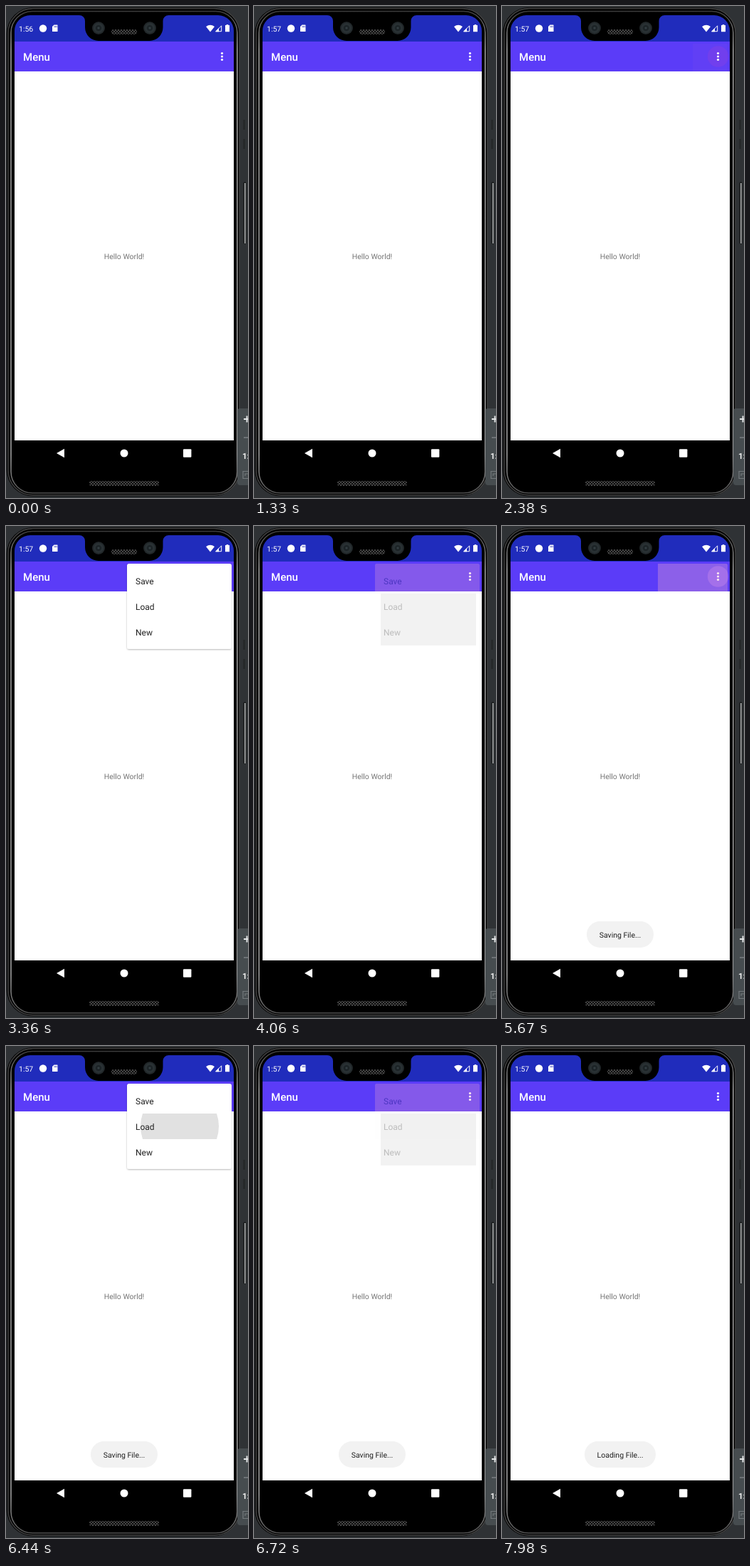
Write an HTML page that moves like this. It is 340 px wide and 692 px high and loops after 8 s.

```html
<!DOCTYPE html>
<html lang="en">
<head>
<meta charset="utf-8">
<title>Options menu</title>
<style>
html, body { margin: 0; width: 100%; height: 100%; overflow: hidden; background: #2f3235; }
svg { display: block; width: 340px; height: 692px; }
text { font-family: Roboto, Arial, sans-serif; font-size: 10.5px; text-rendering: geometricPrecision; }
</style>
</head>
<body>
<svg viewBox="0 0 340 692">
  <defs>
    <linearGradient id="edge" x1="0" y1="0" x2="0" y2="1">
      <stop offset="0" stop-color="#3c3c3c"/>
      <stop offset=".08" stop-color="#a8a8a8"/>
      <stop offset=".5" stop-color="#a0a0a0"/>
      <stop offset=".92" stop-color="#a8a8a8"/>
      <stop offset="1" stop-color="#505050"/>
    </linearGradient>
    <radialGradient id="lens">
      <stop offset="0" stop-color="#3c484c"/>
      <stop offset=".3" stop-color="#181f22"/>
      <stop offset=".6" stop-color="#2c3437"/>
      <stop offset="1" stop-color="#1c2123"/>
    </radialGradient>
    <pattern id="mesh" width="4" height="4" patternUnits="userSpaceOnUse">
      <rect width="4" height="4" fill="#0c0c0c"/>
      <path d="M0 0L4 4M4 0L0 4" stroke="#555" stroke-width=".8"/>
    </pattern>
    <filter id="shade" x="-10%" y="-10%" width="120%" height="120%">
      <feDropShadow dx="0" dy="1" stdDeviation="1.2" flood-opacity=".28"/>
    </filter>
    <clipPath id="screen"><rect x="12" y="13" width="308" height="640" rx="22"/></clipPath>
    <clipPath id="reveal"><rect id="revealBox"/></clipPath>
    <clipPath id="row"><rect id="rowBox" x="170" width="147" height="36"/></clipPath>
  </defs>

  <!-- phone body -->
  <rect width="340" height="692" fill="#2f3235"/>
  <path d="M334.5 160V174M334.5 187V201" stroke="#232527" stroke-width="2"/>
  <rect x="333.5" y="247.5" width="4" height="87" rx="1.5" fill="#17191a"/>
  <path d="M335.8 249V334" stroke="#a0a3a4" stroke-width="1.8"/>
  <rect x="1" y="2" width="327.5" height="687.5" rx="37" fill="#000"/>
  <rect x="3" y="3.5" width="325" height="684.5" rx="35" fill="none" stroke="#444" stroke-width="1.5"/>
  <rect x="7" y="7.5" width="317.8" height="677.5" rx="30" fill="#000" stroke="url(#edge)" stroke-width="1.5"/>

  <!-- screen -->
  <g clip-path="url(#screen)">
    <rect x="12" y="13" width="308" height="38" fill="#202cbc"/>
    <rect x="12" y="50" width="308" height="42" fill="#5b3cf8"/>
    <rect x="12" y="92" width="308" height="519" fill="#fff"/>
    <path d="M103 13A8 8 0 0 1 111 21V30A19 19 0 0 0 130 49H201.5A19 19 0 0 0 220.5 30V21A8 8 0 0 1 228.5 13Z"/>
  </g>
  <rect x="148" y="33" width="36" height="7" rx="3" fill="url(#mesh)"/>
  <circle cx="130" cy="31" r="9" fill="url(#lens)"/>
  <circle cx="202" cy="31" r="9" fill="url(#lens)"/>
  <rect x="117" y="668" width="98" height="7" rx="3" fill="url(#mesh)"/>

  <!-- status bar -->
  <g fill="#fff">
    <text id="clock" x="18" y="35.5"></text>
    <circle cx="52" cy="31.5" r="5.2"/>
    <path d="M67.5 26.5H72Q72.5 26.5 72.5 27V35.500Q72.5 36 72 36H65.5Q65 36 65 35.5V29Z"/>
    <path d="M68 28V30.2M69.6 28V30.2M71.2 28V30.2" stroke="#202cbc" stroke-width=".7"/>
    <path d="M287 36.5L281 29Q287 24.5 293 29Z"/>
    <path d="M294.8 35.7H302.7V27.8Z" fill="none" stroke="#fff" stroke-width="1"/>
    <path d="M294 36.2L299 31V36.2Z"/>
    <path d="M309.7 27V26H312.3V27H314V36.3H308V27Z"/>
  </g>

  <!-- app bar and content -->
  <text x="24" y="77" fill="#fff" style="font-size:15px;font-weight:500">Menu</text>
  <circle id="press" cx="303.5" cy="71" r="14.7"/>
  <g fill="#fff">
    <circle cx="303.5" cy="66.5" r="1.6"/>
    <circle cx="303.5" cy="71" r="1.6"/>
    <circle cx="303.5" cy="75.5" r="1.6"/>
  </g>
  <text x="166" y="355.5" text-anchor="middle" fill="#757575">Hello World!</text>

  <!-- popup -->
  <g id="menu">
    <g clip-path="url(#reveal)">
      <rect id="panel" x="170" y="53" width="147" height="120" rx="3" fill="#fff"/>
      <path id="veil" d="M170 92V56Q170 53 173 53H314Q317 53 317 56V92Z" fill="#ff94b0"/>
      <circle id="ripple" fill="#e1e1e1" clip-path="url(#row)"/>
      <g id="items" fill="#212121"></g>
    </g>
  </g>
  <rect id="inner" x="178" y="95" width="134" height="73"/>

  <g id="toasts"></g>

  <!-- navigation -->
  <g fill="#fff">
    <path d="M71 629L82 622.7V635.3Z"/>
    <circle cx="166" cy="629" r="5.5"/>
    <rect x="249" y="623.3" width="11.4" height="11.4" rx="1"/>
  </g>

  <!-- side panel -->
  <path d="M340 566H329Q325 566 325 570V670Q325 674 329 674H340Z" fill="#464c4f"/>
  <path d="M334 581H340M338.5 576.5V585.5" stroke="#e4e6e7" stroke-width="2"/>
  <path d="M334 607H340" stroke="#7b8184" stroke-width="1.5"/>
  <text x="332" y="637" fill="#f0f0f0" style="font-size:11.5px;font-weight:700">1:1</text>
  <path d="M341 654.5H333V664.5H341M336 661V658H340" fill="none" stroke="#747a7d" stroke-width="1.2"/>
</svg>
<script>
const LOOP = 8000, STEP = 70;
const $ = id => document.getElementById(id);
const clamp = v => Math.max(0, Math.min(1, v));
const ramp = (t, from, to) => clamp((t - from) / (to - from));

function set(el, attrs) {
  for (const k in attrs) el.setAttribute(k, attrs[k]);
  return el;
}

function add(parent, tag, attrs, text = '') {
  const el = document.createElementNS('http://www.w3.org/2000/svg', tag);
  el.textContent = text;
  return parent.appendChild(set(el, attrs));
}

['Save', 'Load', 'New'].forEach((name, i) =>
  add($('items'), 'text', { x: 182, y: 82 + 36 * i, style: 'font-size:12px' }, name));

function makeToast(label, width) {
  const g = add($('toasts'), 'g', {});
  add(g, 'rect', { x: 166 - width / 2, y: 556, width, height: 37, rx: 18.5, fill: '#f2f2f2' });
  add(g, 'text', { x: 166, y: 578.7, 'text-anchor': 'middle', fill: '#212121' }, label);
  return g;
}
const saving = makeToast('Saving File...', 94);
const loading = makeToast('Loading File...', 100);

// One visit to the popup: button press, opening, row tap, closing
const visits = [
  { press: 1960, tint: '#6c3cf0', open: 2310, tap: 3570, close: 3850, row: 0 },
  { press: 5180, tint: '#7e54fa', open: 5530, tap: 6440, close: 6510, row: 1 }
];

function drawPopup(t) {
  const v = visits.find(v => t >= v.press && t < v.close + 280);
  if (!v) {
    for (const id of ['press', 'menu', 'inner']) set($(id), { opacity: 0 });
    return;
  }
  const p = ramp(t, v.open, v.open + 210);
  const left = 1 - ramp(t, v.close, v.close + 280);
  const closing = t > v.close;
  const alpha = closing ? left : p ** 3;
  set($('press'), { fill: v.tint, opacity: p < 1 ? 1 : 0 });

  const w = 147 * p, h = 120 * p;
  set($('revealBox'), p < 1
    ? { x: 317 - w, y: 53, width: w, height: h }
    : { x: 160, y: 43, width: 167, height: 140 });
  set($('menu'), { opacity: alpha });
  set($('panel'), { filter: closing ? 'none' : 'url(#shade)' });
  set($('veil'), { opacity: 1 - alpha });
  set($('inner'), { opacity: closing ? 0.05 : 0 });

  const top = 59 + 36 * v.row;
  set($('rowBox'), { y: top });
  set($('ripple'), {
    cx: 244, cy: top + 18,
    r: t < v.tap ? 0 : 55 + 30 * ramp(t, v.tap, v.tap + STEP),
    opacity: closing ? left * left : 1
  });
}

function draw(ms) {
  const t = Math.floor(ms / STEP) * STEP;
  $('clock').textContent = t < 70 ? '1:56' : '1:57';
  drawPopup(t);
  const swap = ramp(t, 7420, 7980);
  set(saving, { opacity: ramp(t, 4130, 4620) * (1 - swap) });
  set(loading, { opacity: swap });
}

const start = performance.now();
function tick() {
  draw((performance.now() - start) % LOOP);
  requestAnimationFrame(tick);
}
tick();
</script>
</body>
</html>
```
